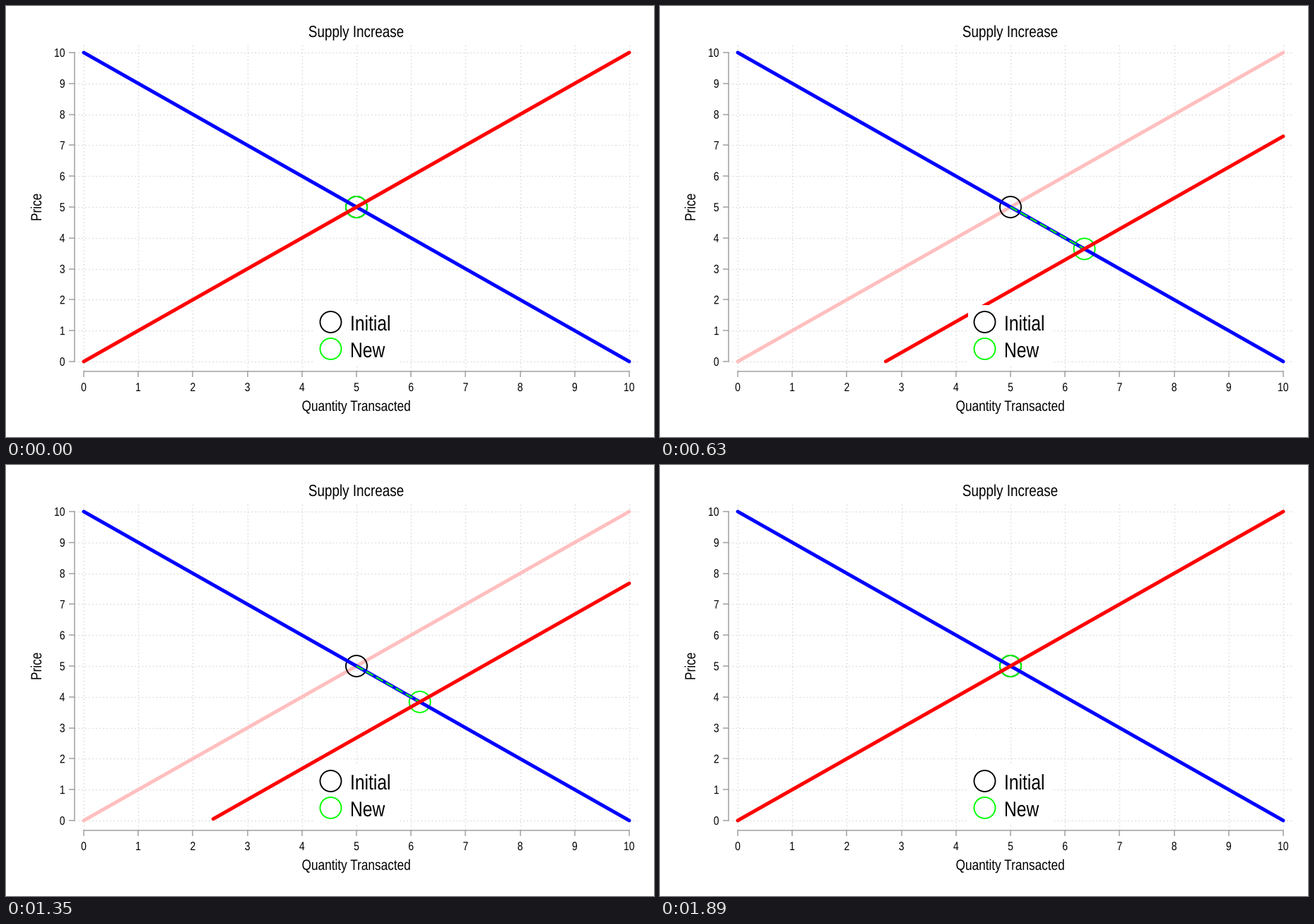
Write a matplotlib script that moves like this. It is 917 px wide and 611 px high and loops after 1920 ms.

```python
import math

import matplotlib.pyplot as plt
from matplotlib.animation import FuncAnimation
from matplotlib.patches import Circle, PathPatch, Rectangle
from matplotlib.textpath import TextPath
from matplotlib.transforms import Affine2D

W, H, DPI = 917, 611, 64
PT = 72 / DPI               # points per pixel
FRAMES, INTERVAL = 64, 30
MAX_SHIFT = 4               # rightward shift of supply at its peak
STEPS = 59                  # intervals in the sampled supply line
CONDENSED = 0.82            # narrow sans face, same for all text

X0, X1, Y0, Y1 = 110, 882, 504, 66
GRAY, GRID = "#a0a0a0", "#d6d6d6"
BLUE, RED, PALE, LIME = "#0000ff", "#ff0000", "#ffbfbf", "#00ff00"

fig = plt.figure(figsize=(W / DPI, H / DPI), dpi=DPI, facecolor="white")
ax = fig.add_axes([0, 0, 1, 1])
ax.set_xlim(0, W)
ax.set_ylim(H, 0)
ax.axis("off")


def px(q):
    return X0 + (X1 - X0) * q / 10


def py(p):
    return Y0 + (Y1 - Y0) * p / 10


def line(xs, ys, color, width, z, cap="butt", dash=None):
    style = "-"
    if dash:
        style = (0, tuple(d / width for d in dash))
    (art,) = ax.plot(xs, ys, color=color, lw=width * PT, ls=style, zorder=z,
                     solid_capstyle=cap, dash_capstyle="butt")
    return art


def curve(q, p, color, z):
    return line([px(v) for v in q], [py(v) for v in p], color, 5, z, "round")


def ring(x, y, color, z):
    return ax.add_patch(Circle((x, y), 15, fill=False, ec=color,
                               lw=1.9 * PT, zorder=z))


def label(x, base, text, size, align="center", angle=0):
    path = TextPath((0, 0), text, size=size, prop={"family": "Liberation Sans"})
    box = path.get_extents()
    shift = {"left": 0, "center": -(box.x0 + box.x1) / 2, "right": -box.x1}[align]
    tr = Affine2D().translate(shift, 0).scale(CONDENSED, -1)
    tr.rotate_deg(angle).translate(x, base)
    ax.add_patch(PathPatch(tr.transform_path(path), fc="black", lw=0, zorder=8))


# grid, axes and ticks
for k in range(11):
    x, y = px(k), py(k)
    line([x, x], [517, 52], GRID, 1.4, 1, dash=(1.4, 3.6))
    line([97, 896], [y, y], GRID, 1.4, 1, dash=(1.4, 3.6))
    line([x, x], [517.5, 525.5], GRAY, 1.5, 2)
    line([88.5, 96.5], [y, y], GRAY, 1.5, 2)
    label(x, 546, str(k), 17)
    label(83, y + 6, str(k), 17, "right")
line([X0, X1], [517.5, 517.5], GRAY, 1.5, 2, "projecting")
line([96.5, 96.5], [Y0, Y1], GRAY, 1.5, 2, "projecting")

label(495.5, 44, "Supply Increase", 23)
label(495.5, 574, "Quantity Transacted", 21)
label(50, 285, "Price", 21, angle=-90)

# legend
ax.add_patch(Rectangle((436, 424), 120, 86, fc="white", lw=0, zorder=7))
for y, color, text in ((448, "black", "Initial"), (486, LIME, "New")):
    ring(459.5, y, color, 8)
    label(487, y + 12, text, 30, "left")

# curves and equilibria
curve([0, 10], [0, 10], PALE, 3)
ring(px(5), py(5), "black", 3.2)
new_eq = ring(px(5), py(5), LIME, 3.4)
curve([0, 10], [10, 0], BLUE, 4)
path = line([], [], LIME, 2.2, 5, dash=(11, 5))
supply = curve([], [], RED, 6)


def update(i):
    shift = MAX_SHIFT * min(i, FRAMES - 1 - i) / (FRAMES // 2 - 1)
    # the line starts at the first sample with a price of zero or more
    start = math.ceil(shift * STEPS / 10 - 1e-9) * 10 / STEPS
    supply.set_data([px(start), X1], [py(start - shift), py(10 - shift)])
    x, y = px(5 + shift / 2), py(5 - shift / 2)
    new_eq.center = (x, y)
    path.set_data([px(5), x], [py(5), y])
    path.set_visible(shift > 0)
    return supply, new_eq, path


anim = FuncAnimation(fig, update, frames=FRAMES, interval=INTERVAL,
                     repeat=True, repeat_delay=0, blit=False)
plt.show()
```
